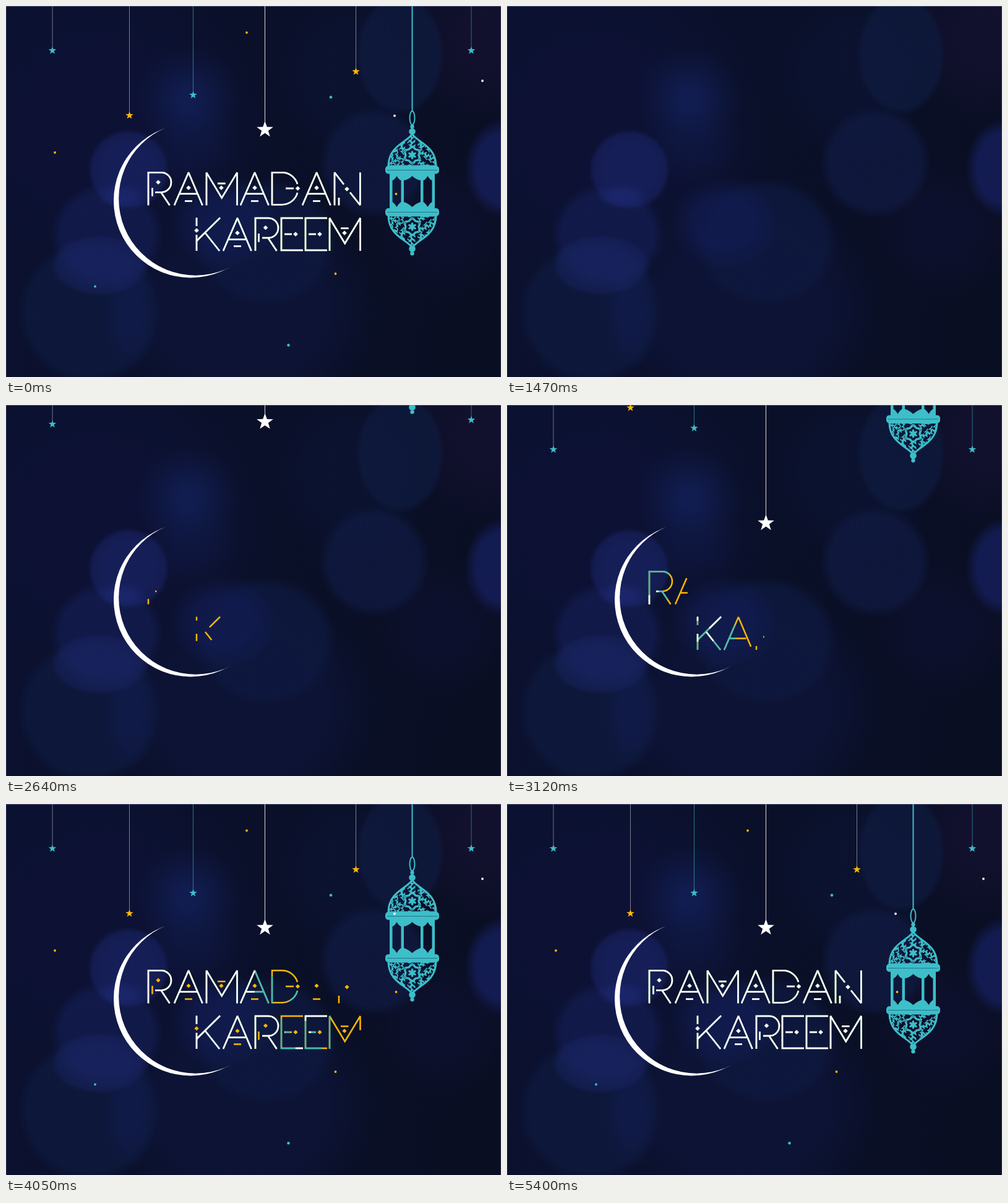
Animation, 800 px wide and 600 px high, one loop 5430 ms. Source, as an HTML page:

```html
<!DOCTYPE html>
<html lang="en">
<head>
<meta charset="utf-8">
<title>Ramadan Kareem</title>
<style>
html, body { margin: 0; width: 100%; height: 100%; overflow: hidden; background: #0a0f24; }
#sky {
  position: absolute; left: 0; top: 0; width: 800px; height: 600px;
  background:
    radial-gradient(66px 66px at 198px 265px, rgba(27,38,108,.62) 60%, rgba(27,38,108,.5) 88%, transparent),
    radial-gradient(80px 50px at 152px 419px, rgba(27,38,104,.55) 55%, rgba(27,38,104,.42) 85%, transparent),
    radial-gradient(42px 20px at 188px 307px, rgba(36,50,140,.45) 40%, transparent),
    radial-gradient(92px 84px at 163px 370px, rgba(20,30,86,.62) 80%, transparent),
    radial-gradient(45px 95px at 200px 495px, rgba(20,30,88,.4) 40%, transparent),
    radial-gradient(118px 118px at 135px 495px, rgba(14,26,64,.7) 85%, transparent),
    radial-gradient(85px 85px at 295px 150px, rgba(18,32,88,.75) 20%, rgba(15,26,70,.4) 70%, transparent),
    radial-gradient(80px 70px at 300px 220px, rgba(16,26,72,.5) 30%, transparent),
    radial-gradient(88px 76px at 352px 350px, rgba(18,28,84,.65) 55%, transparent),
    radial-gradient(115px 105px at 420px 382px, rgba(14,25,64,.75) 82%, transparent),
    radial-gradient(90px 90px at 595px 253px, rgba(16,26,66,.75) 82%, transparent),
    radial-gradient(72px 98px at 637px 78px, rgba(14,26,62,.75) 88%, transparent),
    radial-gradient(62px 80px at 803px 262px, rgba(22,32,96,.75) 70%, transparent),
    radial-gradient(120px 115px at 708px 360px, rgba(16,17,50,.6) 35%, transparent),
    radial-gradient(150px 150px at 780px 50px, rgba(20,17,48,.8) 30%, transparent),
    radial-gradient(130px 140px at 560px 110px, rgba(12,20,54,.6) 50%, transparent),
    radial-gradient(220px 190px at 385px 490px, rgba(13,20,56,.8) 60%, transparent),
    radial-gradient(270px 240px at 165px 195px, rgba(13,18,54,.85) 45%, transparent),
    linear-gradient(100deg, #0b1130, #0a1029 45%, #090e22);
}
svg { position: absolute; left: 0; top: 0; display: block; }
</style>
</head>
<body>
<div id="sky"></div>
<svg width="800" height="600" viewBox="0 0 800 600" fill="none">
  <defs>
    <clipPath id="domeClip"><use href="#domeShape"/></clipPath>
    <mask id="moonMask" maskUnits="userSpaceOnUse" x="0" y="0" width="800" height="600">
      <rect width="800" height="600" fill="#fff"/>
      <circle id="cut" fill="#000" stroke="#000" stroke-opacity=".5"/>
    </mask>
    <path id="domeShape" d="M656.5 207C649 220 618 226 618 259H695C695 226 664 220 656.5 207Z"/>
    <g id="dome" stroke="#3dbec8">
      <g clip-path="url(#domeClip)">
        <path id="lace" stroke-width="1.7"/>
      </g>
      <use href="#domeShape" stroke-width="3"/>
    </g>
  </defs>
  <g id="scene">
    <g mask="url(#moonMask)"><circle id="moon" cx="298.5" cy="315" fill="#fff"/></g>
    <g id="stars"></g>
    <g id="lantern" fill="#3dbec8">
      <path d="M656.5 -420V170" stroke="#3dbec8" stroke-width="2"/>
      <ellipse cx="656.5" cy="181" rx="4" ry="11" fill="none" stroke="#3dbec8" stroke-width="2"/>
      <circle cx="656.5" cy="195" r="3.2"/>
      <circle cx="656.5" cy="203" r="5.3"/>
      <use href="#dome" fill="none"/>
      <use href="#dome" fill="none" transform="matrix(1 0 0 -1 0 598)"/>
      <path id="body" fill-rule="evenodd"/>
      <rect x="613" y="258.5" width="87" height="13" rx="5"/>
      <rect x="613" y="327" width="87" height="13" rx="5"/>
      <path d="M616 265.5H697M616 333.5H697" stroke="#1d6f86" stroke-width=".9"/>
      <circle cx="656.5" cy="392.5" r="5.3"/>
      <circle cx="656.5" cy="400.3" r="3.2"/>
    </g>
    <g id="dots"></g>
    <g id="text" stroke-width="2.5" stroke-miterlimit="2"></g>
  </g>
  <path d="M0 .5H800" stroke="#8a90a8" stroke-opacity=".55"/>
  <path d="M.5 0V600M799.5 0V600" stroke="#8a90a8" stroke-opacity=".3"/>
</svg>
<script>
const LOOP = 5430, STEP = 30;
const GOLD = '#ffb800', TEAL = '#3dbec8', WHITE = '#ffffff';
const INKS = [GOLD, '#3fbdb8', WHITE];
const $ = id => document.getElementById(id);

function add(parent, tag, attrs) {
  const el = document.createElementNS('http://www.w3.org/2000/svg', tag);
  for (const k in attrs) el.setAttribute(k, attrs[k]);
  return parent.appendChild(el);
}
const span = (t, start, length) => Math.min(1, Math.max(0, (t - start) / length));
const sine = u => (1 - Math.cos(Math.PI * u)) / 2;
const cubic = u => u < .5 ? 4 * u ** 3 : 1 - 4 * (1 - u) ** 3;

// Lantern ornament: a rosette with curls around it
function lace(cx, cy) {
  let d = '';
  const ring = (base, wave) => {
    for (let i = 0; i <= 72; i++) {
      const a = i * Math.PI / 36, r = base + wave * Math.cos(6 * a);
      d += (i ? 'L' : 'M') + (cx + r * Math.sin(a)).toFixed(1) + ' ' + (cy - r * Math.cos(a)).toFixed(1);
    }
  };
  ring(13, 1.6);
  ring(11, 1.2);
  ring(3.6, 2.6);
  for (let i = 0; i < 3; i++) {
    const a = i * Math.PI / 3, x = 6 * Math.sin(a), y = 6 * Math.cos(a);
    d += `M${cx - x} ${cy - y}L${cx + x} ${cy + y}`;
  }
  [[19.5, 14, 2.9], [27, 20, 3.1], [34.5, 26, 3]].forEach(([r, n, c]) => {
    for (let i = 0; i < n; i++) {
      const a = (i + .5) * 2 * Math.PI / n, x = cx + r * Math.sin(a), y = cy - r * Math.cos(a);
      d += `M${x - c} ${y}A${c} ${c} 0 1 ${i % 2} ${x} ${y + c}q${i % 2 ? 3 : -3} 2 ${i % 2 ? 4 : -4} 5`;
    }
  });
  return d;
}
$('lace').setAttribute('d', lace(656.5, 241));

const pane = (x, w) => `M${x} 275Q${x + w / 2} 281 ${x + w} 282V317Q${x + w / 2} 319 ${x} 325` +
  `Q${x - w / 2} 319 ${x - w} 317V282Q${x - w / 2} 281 ${x} 275Z`;
$('body').setAttribute('d', 'M620 270H693V328H620Z' + pane(656.5, 13.5) + pane(631.5, 7) + pane(681.5, 7));

// Hanging stars: x, y, radius, colour, string colour, string opacity, start, length
const stars = [
  [75, 72, 6.6, TEAL, WHITE, .42, 2290, 720],
  [199.5, 177, 6.6, GOLD, WHITE, .45, 2978, 900],
  [302.5, 144, 6.6, TEAL, TEAL, .6, 2818, 830],
  [418.5, 200, 14, WHITE, WHITE, .85, 2400, 829],
  [565.5, 106, 6.6, GOLD, WHITE, .45, 3090, 800],
  [752, 72, 6.6, TEAL, TEAL, .55, 2330, 720]
].map(([x, y, r, fill, line, alpha, start, length]) => {
  const g = add($('stars'), 'g', {});
  add(g, 'path', { d: `M${x} -20V${y - r + 1}`, stroke: line, 'stroke-opacity': alpha });
  const pts = [...Array(10).keys()].map(i => {
    const a = i * Math.PI / 5, q = i % 2 ? r * .4 : r;
    return [x + q * Math.sin(a), y - q * Math.cos(a)];
  });
  add(g, 'polygon', { points: pts.join(' '), fill });
  return { g, drop: y + r, start, length };
});

// Sparkles: x, y, radius, colour, start
const dots = [
  [770, 121, 1.9, WHITE, 3150], [144, 453.5, 1.9, TEAL, 3140], [389, 43, 1.9, GOLD, 3240],
  [525, 147.5, 2.3, TEAL, 3300], [79, 237, 1.9, GOLD, 3380], [628, 177.5, 1.9, WHITE, 3420],
  [630.5, 304, 1.9, GOLD, 3470], [532.5, 433, 1.9, GOLD, 3520], [456.5, 548.5, 2.3, TEAL, 3580]
].map(([cx, cy, r, fill, start]) => ({ el: add($('dots'), 'circle', { cx, cy, fill }), r, start }));

// Letter strokes, each drawn from its first point
const A = (x, y) => [`M${x - 23} ${y + 53}L${x} ${y}L${x + 22.5} ${y + 53}`, `M${x - 14.5} ${y + 34.5}H${x + 14}`];
const R = (x, y) => [`M${x} ${y + 53}V${y}H${x + 21}A16 16 0 0 1 ${x + 21} ${y + 32}`,
  `M${x + 11} ${y + 32}H${x + 20.5}L${x + 34.5} ${y + 53}`];
const M = (x, y) => [`M${x} ${y + 53}V${y}L${x + 24.7} ${y + 41}L${x + 49.5} ${y}V${y + 53}`];
const bar = (x, y) => `M${x} ${y + 26}h12`;

const letters = [
  [2612, R(230, 269.3)],
  [2960, A(295, 269.3)],
  [3180, M(324, 269.3)],
  [3390, A(402, 269.3)],
  [3650, ['M430 322.3V269.3H446A26 26 0 0 1 471 288', 'M471 302A26 26 0 0 1 446 321.3H430']],
  [4060, A(502, 269.3)],
  [4480, ['M531 322.3V269.3L546 288.5', 'M556 301.5L572.3 322V269.3'], 1],
  [2460, ['M308 342.5V356', 'M308 370V396', 'M346 342.5L308 380', 'M322 367L345 396']],
  [2740, A(374, 343)],
  [3100, R(403, 343)],
  [3550, ['M480 395H445V343H480', bar(450, 343)]],
  [3450, ['M519 343H484V395H519', bar(489, 343)]],
  [3710, M(523, 343)]
];

const INK_LAG = 230, INK_TIME = 400;
const inks = INKS.map(stroke => add($('text'), 'g', { stroke }));
const trims = [], gems = [];
function trim(layer, d, start, length) {
  const el = add(inks[layer], 'path', { d, pathLength: 1 });
  trims.push({ el, start, length });
}
letters.forEach(([start, paths, chained]) => INKS.forEach((_, i) => paths.forEach((d, k) => {
  const part = chained ? INK_TIME / 2 : INK_TIME;
  const wait = chained ? k * part * .78 : 0;
  trim(i, d, start + i * INK_LAG + wait, part);
})));

// Ornaments inside the letters change ink together
const dashes = ['M236.5 294V307.5', 'M289 315.5H301', 'M342 287H354.5', 'M396 315.5H408', 'M452 295H465',
  'M496 315.5H508', 'M538 310V322.3', 'M368 388.5H380', 'M408.5 368V381.5', 'M541 359.5H553.5'];
const diamonds = [[246, 285], [295, 294], [348, 294], [402, 294], [471.5, 295], [502, 294], [551, 296],
  [308, 363], [374, 367], [419.5, 358.5], [468, 369], [507, 369], [547, 367]];
[3500, 4200, 4950].forEach((start, i) => {
  dashes.forEach(d => trim(i, d, start, 300));
  diamonds.forEach(([x, y]) => gems.push({
    el: add(inks[i], 'path', { d: 'M0 -3.6L3.6 0L0 3.6L-3.6 0Z', fill: INKS[i], stroke: 'none' }), x, y, start
  }));
});

function draw(now) {
  const clock = Math.floor((now % LOOP) / STEP) * STEP;
  const leaving = clock < 1470;
  const t = leaving ? clock + LOOP : clock;

  $('scene').setAttribute('opacity', leaving ? 1 - span(clock, 780, 510) : 1);

  $('moon').setAttribute('r', 124.5 * sine(span(t, 1665, 375)));
  // The bite grows out of its upper right corner
  const s = cubic(span(t, 2073, 177)), r = 124.3 * s, cut = $('cut');
  cut.setAttribute('cx', 430.8 - r);
  cut.setAttribute('cy', 187.1 + r);
  cut.setAttribute('r', r);
  cut.setAttribute('stroke-width', s > 0 ? 4 * (1 - s) : 0);

  stars.forEach(o => o.g.setAttribute('transform',
    `translate(0 ${-o.drop * (1 - sine(span(t, o.start, o.length)))})`));
  $('lantern').setAttribute('transform', `translate(0 ${-404 * (1 - sine(span(t, 2337, 2452)))})`);
  dots.forEach(o => o.el.setAttribute('r', o.r * sine(span(t, o.start, 300))));

  trims.forEach(o => {
    const p = span(t, o.start, o.length);
    o.el.style.visibility = p > 0 ? 'visible' : 'hidden';
    o.el.setAttribute('stroke-dasharray', p < 1 ? `${p} 2` : 'none');
  });
  gems.forEach(o => o.el.setAttribute('transform',
    `translate(${o.x} ${o.y}) scale(${sine(span(t, o.start, 300))})`));

  // Only the white ink stays once the lettering has settled
  const settled = leaving && clock >= 90;
  inks[0].style.display = inks[1].style.display = settled ? 'none' : '';
}

const begin = performance.now();
function tick() {
  draw(performance.now() - begin);
  requestAnimationFrame(tick);
}
tick();
</script>
</body>
</html>
```
